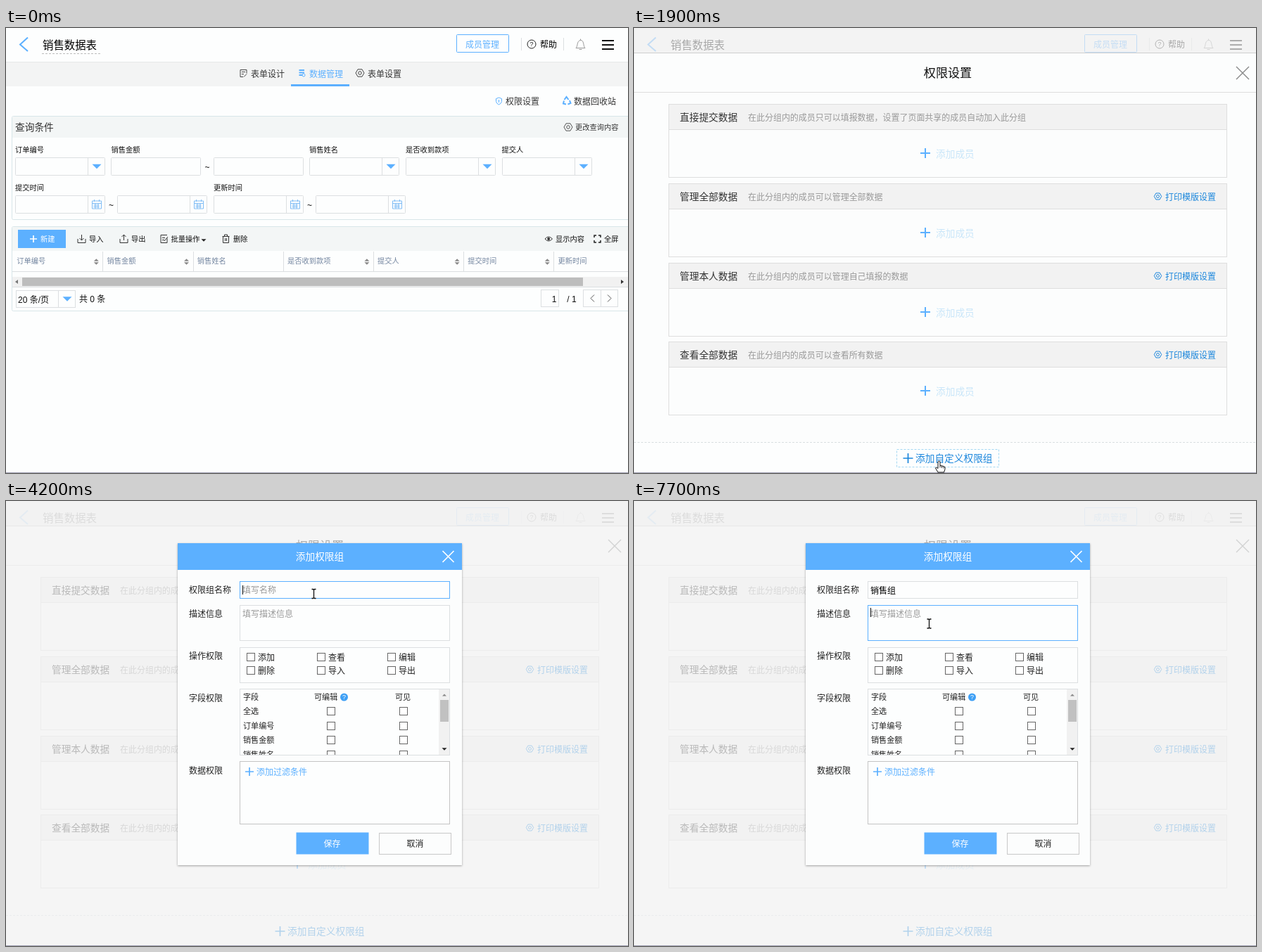
These frames come from a looping animation (884 by 633 pixels, 8000 ms). An HTML page:

```html
<!DOCTYPE html>
<html lang="zh-CN">
<head>
<meta charset="utf-8">
<title>权限设置</title>
<style>
html, body { margin: 0; width: 100%; height: 100%; overflow: hidden; background: #fdfefe; }
svg { display: block; width: 884px; height: 633px; font-family: "Liberation Sans", "Noto Sans CJK SC", "Noto Sans CJK", sans-serif; }
text { white-space: pre; }
</style>
</head>
<body>
<svg id="stage" viewBox="0 0 884 633" xmlns="http://www.w3.org/2000/svg"></svg>
<script>
const LOOP = 8000, STEP = 100;
const BLUE = '#5cb0ff', LINK = '#1a86dc', LINE = '#dcdfe1', INK = '#111', GREY = '#555';

// cy is the optical centre of the line of text
const text = (x, cy, size, fill, str, attrs = '') =>
  `<text x="${x}" y="${cy + size * .38}" font-size="${size}" fill="${fill}" ${attrs}>${str}</text>`;
const mid = (x, cy, size, fill, str) => text(x, cy, size, fill, str, 'text-anchor="middle"');
const fillRect = (x, y, w, h, fill) => `<rect x="${x}" y="${y}" width="${w}" height="${h}" fill="${fill}"/>`;
const box = (x, y, w, h, stroke = LINE, fill = '#fdfefe', attrs = '') =>
  `<rect x="${x + .5}" y="${y + .5}" width="${w - 1}" height="${h - 1}" fill="${fill}" stroke="${stroke}" ${attrs}/>`;
const path = (d, stroke, width = 1, fill = 'none', attrs = '') =>
  `<path d="${d}" fill="${fill}" stroke="${stroke}" stroke-width="${width}" ${attrs}/>`;
const solid = (d, fill) => `<path d="${d}" fill="${fill}"/>`;
const vline = (x, y1, y2, c = LINE) => fillRect(x, y1, 1, y2 - y1, c);
const hline = (y, x1, x2, c = LINE) => fillRect(x1, y, x2 - x1, 1, c);
const circle = (x, y, r, stroke, fill = 'none') => `<circle cx="${x}" cy="${y}" r="${r}" fill="${fill}" stroke="${stroke}"/>`;
const plus = (x, y, r, c, w = 2) => path(`M${x - r} ${y}h${2 * r}M${x} ${y - r}v${2 * r}`, c, w);
const cross = (x, y, r, c, w) => path(`M${x - r} ${y - r}l${2 * r} ${2 * r}M${x + r} ${y - r}l${-2 * r} ${2 * r}`, c, w);
const down = (x, y, r, c) => solid(`M${x - r} ${y - r / 2}h${2 * r}l${-r} ${r}z`, c);
const up = (x, y, r, c) => solid(`M${x - r} ${y + r / 2}h${2 * r}l${-r} ${-r}z`, c);
const gear = (x, y, r, c) => {
  const corners = [0, 1, 2, 3, 4, 5].map(i => {
    const a = i * Math.PI / 3;
    return `${(x + r * Math.cos(a)).toFixed(1)} ${(y + r * Math.sin(a)).toFixed(1)}`;
  });
  return path(`M${corners.join('L')}z`, c, 1, 'none', 'stroke-linejoin="round"') + circle(x, y, r * .38, c);
};

function field(x, y, kind) {
  let s = box(x, y, 128, 26, LINE, '#fdfefe', 'rx="1"');
  if (kind) s += vline(x + 103, y, y + 26);
  if (kind === 'select') s += down(x + 116, y + 13, 6.5, BLUE);
  if (kind === 'date') {
    const l = x + 109.5, t = y + 8;
    s += path(`M${l} ${t}h13v11h-13zM${l} ${t + 3.5}h13M${l + 2} ${t + 6}h8M${l + 2} ${t + 8.5}h8M${l + 4.5} ${t + 4}v7M${l + 8.5} ${t + 4}v7M${l + 3} ${t - 2}v3M${l + 10} ${t - 2}v3`, '#7fbcf5');
  }
  return s;
}

function page() {
  const small = 10.25;
  let s = fillRect(0, 0, 884, 633, '#fdfefe') + fillRect(0, 48, 884, 35, '#f3f4f4') + hline(48, 0, 884, '#e6e8e8');
  s += path('M31 13.5L20 23.5L31 33', BLUE, 2) + text(52, 24, 15.4, '#000', '销售数据表');
  s += path('M51 36.5H134', '#bbb', 1, 'none', 'stroke-dasharray="3 2"');
  s += box(640, 9, 75, 26, BLUE, '#fdfefe', 'rx="1"') + mid(677, 23, 12, BLUE, '成员管理');
  s += vline(732, 14, 32) + vline(792, 14, 32);
  s += circle(747, 23, 6, '#222') + mid(747, 23, 9, '#222', '?') + text(759, 23, 12, '#000', '帮助');
  s += path('M810 28.5C813 26 811 18 816.5 17.5S820 26 823 28.5zM816.5 17.5V15.5M814.5 30.5h4', '#999');
  [17, 23, 29].forEach(y => s += fillRect(847, y, 17, 2, '#111'));

  s += path('M333 59.5h9v5M333 59.5v10h4M335 62.5h5M335 65.5h3M338 69.5l4-4', '#444') + text(348, 65, 12, '#333', '表单设计');
  s += [60, 63.5, 67].map(y => path(`M416.5 ${y}h7.5`, BLUE, 2)).join('') + circle(423, 67, 2, BLUE, '#fff') + text(431, 65, 12, BLUE, '数据管理');
  s += fillRect(405, 80, 83, 3, BLUE) + gear(503, 64, 6, '#444') + text(514, 65, 12, '#333', '表单设置');

  s += path('M700.5 99l4 1.5v4q-.5 3-4 4.5q-3.5-1.5-4-4.5v-4zM700.5 102v4', BLUE);
  s += text(710, 104, 12, '#333', '权限设置', 'id="access"');
  s += path('M793.5 102l3-4 3 4M801 103l1.5 4-4 1.5M796 108.5l-4-1 1-4', BLUE, 2) + text(807, 104, 12, '#333', '数据回收站');

  s += box(8, 125, 880, 148, '#d8e6e9', '#fdfefe', 'rx="2"') + fillRect(9, 126, 875, 30, '#f3f6f6');
  s += text(13, 141, 13.7, '#333', '查询条件') + gear(799, 141, 6, GREY) + text(809, 141, small, '#333', '更改查询内容');
  [[13, '订单编号'], [149.5, '销售金额'], [431, '销售姓名'], [568, '是否收到款项'], [704.5, '提交人']]
    .forEach(([x, label]) => s += text(x, 173, small, INK, label));
  [13, 431, 568, 705].forEach(x => s += field(x, 184, 'select'));
  [149, 295].forEach(x => s += field(x, 184));
  s += mid(286, 197, 12, INK, '~') + mid(149.5, 251, 12, INK, '~') + mid(431.5, 251, 12, INK, '~');
  s += text(13, 227, small, INK, '提交时间') + text(295, 227, small, INK, '更新时间');
  [13, 158, 295, 440].forEach(x => s += field(x, 238, 'date'));

  s += box(8, 282, 880, 121, '#d8e6e9', '#fdfefe', 'rx="2"') + fillRect(9, 283, 875, 34, '#f3f6f6');
  s += fillRect(17, 287, 68, 26, BLUE) + plus(39, 300, 5, '#fff', 1.7) + text(49, 300, small, '#fff', '新建');
  const tray = x => `M${x - 5.5} 300v5.5h11v-5.5`;
  s += path(tray(107.5) + 'M107.5 294v8M104.5 299l3 3 3-3', '#333') + text(118, 300, small, INK, '导入');
  s += path(tray(167.5) + 'M167.5 302v-8M164.5 297l3-3 3 3', '#333') + text(178, 300, small, INK, '导出');
  s += path('M229 299v6.5h-9v-11h9M222 298.5h4M222 301.5h3M225 303l5-6', '#333') + text(234.5, 300, small, INK, '批量操作') + down(281, 302, 3.5, '#222');
  s += path('M307.5 296.5h10M308.5 297v8.5h8v-8.5M310.5 296v-2h4v2M311.5 299v4M313.5 299v4', '#333') + text(323, 300, small, INK, '删除');
  s += path('M766 300q5-6 10.5 0q-5.5 6-10.5 0z', '#333') + circle(771.2, 300, 1.5, '#333', '#333') + text(781, 300, small, INK, '显示内容');
  s += path('M836 298v-3h3M842 295h3v3M845 302v3h-3M839 305h-3v-3', '#222', 1.5) + text(850, 300, small, INK, '全屏');

  ['订单编号', '销售金额', '销售姓名', '是否收到款项', '提交人', '提交时间', '更新时间'].forEach((label, i) => {
    const x = 15.3 + i * 128.2;
    s += text(x, 331, small, '#7486a0', label);
    if (i < 6) s += vline(Math.round(x + 122), 318, 346);
    if (i < 6 && i !== 2) s += up(x + 113, 330, 3.5, '#888') + down(x + 113, 335, 3.5, '#888');
  });
  s += hline(346, 9, 884) + fillRect(9, 354, 875, 14, '#f1f1f1') + fillRect(23, 355, 797, 12, '#bdbdbd') + hline(368, 9, 884);
  s += solid('M17 358v6l-4-3z', '#777') + solid('M874 358v6l4-3z', '#333');
  s += box(14, 373, 85, 25) + vline(74, 373, 398) + text(17, 386, 12, INK, '20 条/页') + down(87, 385.5, 6.5, BLUE) + text(104, 385, 12, INK, '共 0 条');
  s += box(760, 372, 26, 25) + mid(779, 385, 12, INK, '1') + mid(804, 385, 12, INK, '/ 1');
  s += box(820, 372, 50, 25) + vline(845, 372, 397) + path('M836 379.5l-5 5 5 5M855 379.5l5 5-5 5', GREY);
  return s;
}

function panel() {
  let s = fillRect(0, 35, 884, 598, '#fcfdfd') + hline(35, 0, 884, '#cfcfcf') + hline(91, 0, 884, '#dedede');
  s += mid(446, 64, 17.1, INK, '权限设置') + cross(865, 64, 9, '#888', 1.4);
  [['直接提交数据', '在此分组内的成员只可以填报数据，设置了页面共享的成员自动加入此分组'],
   ['管理全部数据', '在此分组内的成员可以管理全部数据'],
   ['管理本人数据', '在此分组内的成员可以管理自己填报的数据'],
   ['查看全部数据', '在此分组内的成员可以查看所有数据']].forEach(([name, note], i) => {
    const y = Math.round(108 + i * 112.8), cy = y + 19;
    s += box(49, y, 794, 105, '#dedede', '#fcfdfd') + box(49, y, 794, 37, '#dedede', '#f2f2f2');
    s += text(65, cy, 13.7, '#333', name) + text(162, cy + .5, 11.97, '#999', note);
    s += plus(414, y + 70, 7, BLUE) + text(429, y + 70.5, 13.7, '#c9e6f9', '添加成员');
    if (i) s += gear(744.5, cy - .5, 5.2, LINK) + text(755, cy, 12, LINK, '打印模版设置');
  });
  s += fillRect(0, 589, 884, 44, '#fdfefe') + path('M0 589.5H884', '#d9dfe1', 1, 'none', 'stroke-dasharray="3 2"');
  s += box(373, 599, 146, 26, '#a5d8f3', 'none', 'id="addHover" stroke-dasharray="3 2"');
  return s + plus(389.5, 612, 7, LINK, 1.7) + text(400, 612, 13.7, LINK, '添加自定义权限组');
}

function modal() {
  const check = (cx, cy) => box(Math.round(cx - 6), Math.round(cy - 6), 12, 12, '#666', '#fff');
  let s = '<rect x="244" y="60" width="404" height="458" fill="#fcfdfd" filter="url(#shadow)"/>' + fillRect(244, 60, 404, 38, BLUE);
  s += mid(446, 79, 13.7, '#fff', '添加权限组') + cross(628.5, 79, 8, '#fff', 1.7);
  [[126, '权限组名称'], [160.5, '描述信息'], [220, '操作权限'], [280, '字段权限'], [383, '数据权限']]
    .forEach(([y, label]) => s += text(260, y, 12, '#222', label));
  s += box(332, 114, 299, 25) + box(332, 148, 299, 51) + box(332, 208, 299, 51) + box(332, 267, 299, 95) + box(332, 370, 299, 90, '#c4c4c4');
  s += box(332, 114, 299, 25, BLUE, 'none', 'id="nameFocus"') + box(332, 148, 299, 51, BLUE, 'none', 'id="noteFocus"');
  s += text(336, 126.5, 12, '#999', '填写名称', 'id="hint"') + text(336, 127, 12, '#000', '销售组', 'id="name" font-weight="500"');
  s += text(336, 160.5, 12, '#999', '填写描述信息') + '<rect id="caret" width="1" height="13" fill="#111"/>';
  [['添加', '查看', '编辑'], ['删除', '导入', '导出']].forEach((row, r) => row.forEach((label, c) => {
    const x = 347.5 + c * 100, y = 222 + r * 19;
    s += check(x, y) + text(x + 10.5, y, 12, '#222', label);
  }));
  s += text(337, 279, 11.1, '#222', '字段') + text(438, 279, 11.1, '#222', '可编辑') + text(553, 279, 11.1, '#222', '可见');
  s += circle(480.5, 279, 5.5, 'none', '#3fa0f5') + mid(480.5, 279, 9, '#fff', '?');
  s += '<g clip-path="url(#rows)">';
  ['全选', '订单编号', '销售金额', '销售姓名'].forEach((label, i) => {
    const y = 299 + i * 20.5;
    s += text(337, y, 11.1, '#222', label) + check(462, y) + check(564.5, y);
  });
  s += '</g>' + fillRect(615, 268, 15, 93, '#f1f1f1') + fillRect(617, 283, 12, 31, '#c1c1c1') + up(623, 276, 3, '#888') + down(623, 353, 3.5, '#222');
  s += plus(346, 385, 6, BLUE, 1.7) + text(356, 385, 12, BLUE, '添加过滤条件');
  s += fillRect(412.5, 471.5, 103, 31, BLUE) + mid(463.5, 487, 12, '#fff', '保存');
  return s + box(530, 472, 103, 31, '#c8c8c8', '#fcfdfd') + mid(581.5, 487, 12, '#222', '取消');
}

const RED = '#d20019', GOLD = '#f3c257';
const lantern = (x, y, r) => path(`M${x} 168V${y - r}M${x} ${y + r}v7`, GOLD) + circle(x, y, r, '#f0301f', '#ee1c14') +
  fillRect(x - r / 2, y - r - 1, r, 2, GOLD) + fillRect(x - r / 2, y + r - 1, r, 2, GOLD);

// Gold brushwork: each stroke has a dark edge, a gold body and a pale core
const BRUSH = [
  ['M41 192C40 180 50 178 54 184C60 194 50 207 40 218C48 211 55 222 66 217', 5],
  ['M52 184C48 172 56 168 64 170C74 172 86 168 100 169C94 178 82 175 72 175C62 175 60 182 68 185C76 187 84 183 92 186', 4],
  ['M76 176C68 182 64 190 60 196', 3],
  ['M64 196C55 204 57 217 64 215C72 211 73 195 64 196', 4],
  ['M77 192C77 202 75 210 72 218', 4],
  ['M87 190C77 198 76 216 82 215C89 211 87 202 79 209', 4],
  ['M90 222C98 214 104 228 112 221C122 215 112 211 107 219C103 226 116 227 126 219', 2]
];
const brush = (extra, color) => BRUSH.map(([d, w]) => path(d, color, Math.max(.8, w + extra))).join('');

function imeBar(typed, words) {
  let x = 382, s = '';
  words.split(' ').forEach((word, i) => {
    s += text(x, 216, 11.5, '#ffe9e4', `${i + 1}.`, 'font-family="Liberation Mono, monospace"');
    s += text(x + 13.8, 216, 13.6, '#fff', word, 'font-weight="300" font-family="Noto Serif CJK SC, Noto Sans CJK SC, Noto Serif, serif"');
    x += 24.6 + 13.7 * word.length;
  });
  x = Math.round(x);
  const back = box(348, 167, x + 132 - 348, 66, '#a30b16', RED, 'rx="3"') + hline(168, 350, x + 130, '#b00014') +
    path('M350 172h22v4h-16v5h10M351 178h8v6M376 170v8h-7', '#8d1a12', 1.5) + lantern(362.5, 201, 11) +
    circle(361.5, 224, 3.5, GOLD, '#8c6a2a');
  const nav = solid(`M${x + 5} 212v9l-5-4.5z`, '#d9868b') + solid(`M${x + 10} 211.5v10l5-5z`, '#fff') +
    box(x + 21, 211, 12, 11, '#f3b6b6', 'none') + down(x + 27, 217, 3, '#fff');
  const greeting = [...'贺新年'].map((c, i) => text(86 + i * 14, 207 - i * 3, 15.5, '#ffe08f', c,
    'font-weight="900" stroke="#8c1a10" stroke-width="2" paint-order="stroke"')).join('');
  const art = `<g transform="translate(${x} 0)" stroke-linecap="round" stroke-linejoin="round">` +
    brush(2, '#8c1a10') + brush(0, GOLD) + brush(-3.2, '#fff0b4') + lantern(122, 180, 7) + greeting + '</g>';
  return back + text(382, 186.5, 12.5, '#fff', typed, 'id="typed" font-weight="bold"') +
    '<rect id="imeCaret" y="180" width="1" height="14" fill="#fff"/>' + s + nav + art;
}

const IME = [
  [4900, 'x', '下 想 小 行 向'],
  [5100, 'xi', '系 西 洗 喜 细'],
  [5300, "xiao's", '销售 小数 小时 消失 潇洒'],
  [5400, "xiao'sh", '小时 消失 销售 小说 小事'],
  [5500, "xiao'shou", '销售 小手 小受 消瘦 销售额'],
  [5900, "xiao'shou'z", '销售组 销售中 销售者 销售总 销售在'],
  [6000, "xiao'shou'zu", '销售组 销售 小手 小受 消瘦'],
  [6300, '', '']
];
const BLINKS = [3000, 3700, 4200, 4700, 5100, 5600, 6100, 6700, 7200];
const ROUTE = [[200, 782, 113], [600, 737, 105], [1000, 737, 105], [1300, 597, 293], [1600, 446, 588], [1900, 433.5, 615.5],
  [2400, 433.5, 615.5], [2800, 437.5, 132], [6900, 437.5, 132], [7000, 436, 121], [7300, 419.5, 174.5]];

const pointers = {
  arrow: path('M0 0V15.5L3.6 12.2L6.2 18L8.6 17L6.1 11.3H11z', '#111', 1, '#fff'),
  hand: path('M-1.5 1.5Q0-.5 1.5 1.5V7L4 7.3L6.5 8L8.5 9.2V12L7 16.5H-1.5L-5 10.5Q-4.5 8.5-1.5 11z', '#111', 1, '#fff') + path('M1.5 7v3M4 7.5v3M6.5 8.5v2.5', '#111', .8),
  beam: path('M-3-6.5h2l1 1 1-1h2M0-5.5V5.5M-3 6.5h2l1-1 1 1h2', '#111', 1.3)
};

const stage = document.getElementById('stage');
stage.innerHTML = `<defs><clipPath id="rows"><rect x="333" y="268" width="282" height="93"/></clipPath>
  <filter id="shadow" x="-5%" y="-5%" width="110%" height="110%"><feDropShadow dx="0" dy="1" stdDeviation="1.5" flood-opacity=".35"/></filter></defs>
  ${page()}<rect id="veil1" width="884" height="633" fill="#f0f0f0"/><g id="panel">${panel()}</g>
  <rect id="veil2" width="884" height="633" fill="#f2f2f2"/><g id="modal">${modal()}</g><g id="ime"></g>
  ${hline(632, 0, 884, '#a3a3b5')}<g id="pointer"></g>`;

const $ = id => document.getElementById(id);
const clamp = v => Math.max(0, Math.min(1, v));
const easeOut = u => 1 - (1 - clamp(u)) ** 3;
const set = (id, attrs) => Object.entries(attrs).forEach(([k, v]) => $(id).setAttribute(k, v));
const show = (id, on) => set(id, { visibility: on ? 'inherit' : 'hidden' });

function along(t) {
  const i = ROUTE.findIndex(p => p[0] > t);
  if (i < 0) return ROUTE[ROUTE.length - 1].slice(1);
  if (i === 0) return [-50, -50];
  const [t0, x0, y0] = ROUTE[i - 1], [t1, x1, y1] = ROUTE[i], u = (t - t0) / (t1 - t0);
  return [x0 + (x1 - x0) * u, y0 + (y1 - y0) * u];
}

function draw(t) {
  const rise = easeOut((t - 700) / 331), drop = easeOut((t - 2000) / 331);
  set('veil1', { opacity: .7 * rise });
  set('panel', { transform: `translate(0 ${Math.round(598 * (1 - rise))})` });
  show('panel', rise > 0);
  set('veil2', { opacity: .7 * drop });
  set('modal', { transform: `translate(0 ${Math.round(-195 * (1 - drop))})`, opacity: drop });
  show('modal', drop > 0);

  const linkHover = t >= 400 && t < 800, addHover = t >= 1700 && t < 2100;
  set('access', { fill: linkHover ? BLUE : '#333' });
  show('addHover', addHover);

  const toNote = clamp((t - 7400) / 300), named = t >= 6300;
  set('nameFocus', { opacity: Math.min(clamp((t - 2900) / 200), 1 - toNote) });
  set('noteFocus', { opacity: toNote });
  show('hint', !named);
  show('name', named);
  set('caret', { x: named && t < 7500 ? 371 : 336, y: t < 7500 ? 120 : 152 });
  show('caret', BLINKS.filter(b => b <= t).length % 2);

  const entry = IME.filter(e => e[0] <= t).pop();
  $('ime').innerHTML = entry && entry[1] ? imeBar(entry[1], entry[2]) : '';
  if ($('typed')) set('imeCaret', { x: Math.round(382 + $('typed').getComputedTextLength()) });

  const [x, y] = along(t);
  const inField = t >= 2800 && !(y > 138 && y < 148);
  $('pointer').innerHTML = pointers[linkHover || addHover ? 'hand' : inField ? 'beam' : 'arrow'];
  set('pointer', { transform: `translate(${x} ${y})` });
}

const start = performance.now();
let shown = -1;
function tick() {
  const t = Math.floor((performance.now() - start) % LOOP / STEP) * STEP;
  if (t !== shown) draw(shown = t);
  requestAnimationFrame(tick);
}
tick();
</script>
</body>
</html>
```
